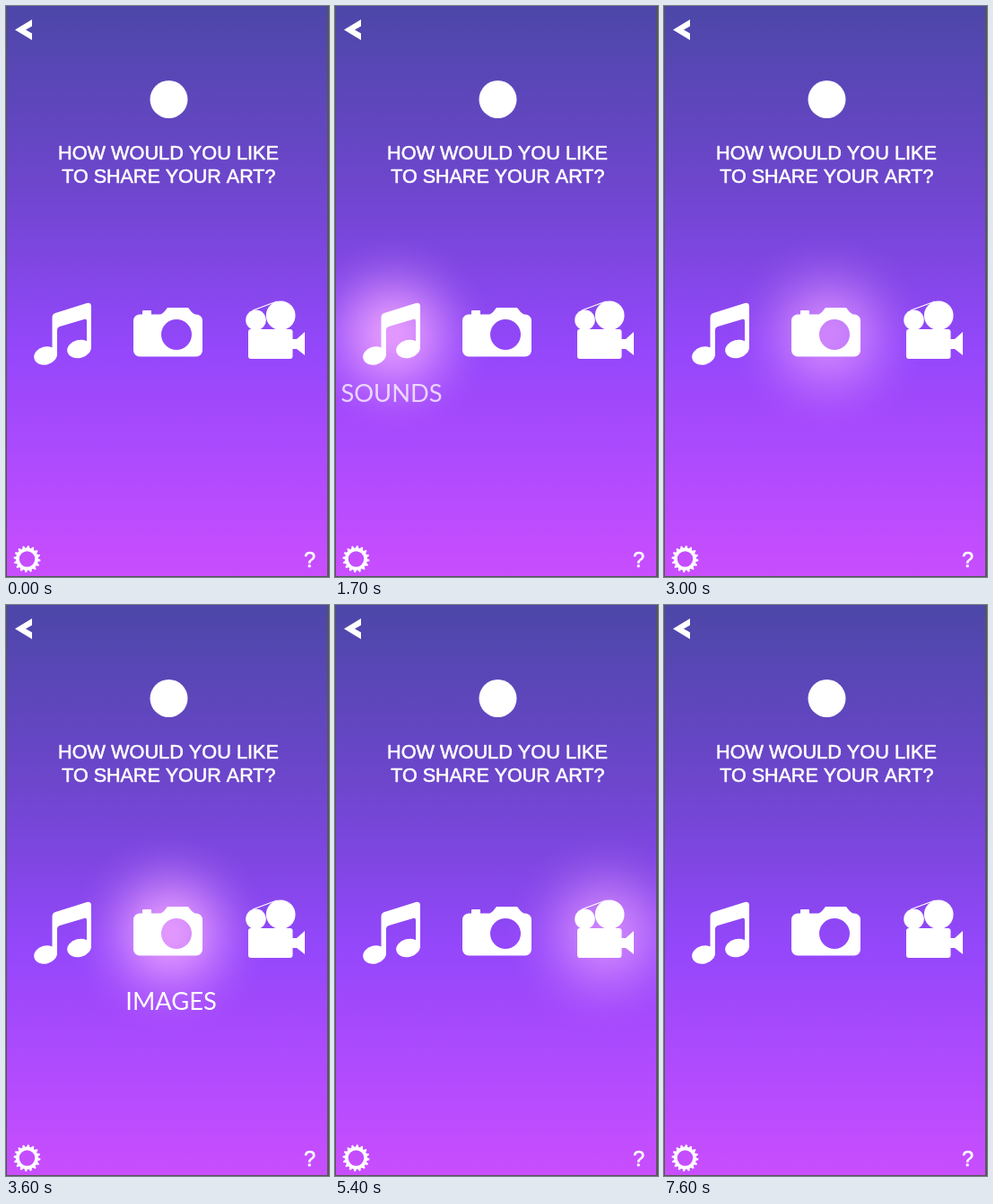
These frames come from a looping animation (360 px wide and 636 px high, 7700 ms). An HTML page with a canvas:

```html
<!DOCTYPE html>
<html lang="en">
<head>
<meta charset="utf-8">
<title>Share your art</title>
<style>
html, body { margin: 0; width: 100%; height: 100%; overflow: hidden; background: #4c47a8; }
canvas { display: block; }
</style>
</head>
<body>
<canvas id="stage"></canvas>
<script>
const W = 360, H = 636, STEP = 100, STEPS = 77;
const canvas = document.getElementById('stage');
const ctx = canvas.getContext('2d');
const ratio = window.devicePixelRatio || 1;
canvas.width = W * ratio;
canvas.height = H * ratio;
canvas.style.width = W + 'px';
canvas.style.height = H + 'px';
ctx.scale(ratio, ratio);

const items = [
  { label: 'SOUNDS', x: 63, base: 440.5, gx: 65, gy: 366 },
  { label: 'IMAGES', x: 184, base: 451, gx: 183, gy: 365 },
  { label: 'VIDEOS', x: 301, base: 458, gx: 302, gy: 365 }
];
const clamp = v => Math.max(0, Math.min(1, v));

const sky = ctx.createLinearGradient(0, 0, 0, H);
sky.addColorStop(0, '#4c47a8');
sky.addColorStop(0.3, '#6c46cb');
sky.addColorStop(0.6, '#9447fb');
sky.addColorStop(1, '#c94eff');

function poly(...pts) {
  ctx.beginPath();
  for (let i = 0; i < pts.length; i += 2) ctx.lineTo(pts[i], pts[i + 1]);
  ctx.closePath();
  ctx.fill();
}

function oval(x, y, rx, ry = rx, turn = 0) {
  ctx.beginPath();
  ctx.ellipse(x, y, rx, ry, turn, 0, Math.PI * 2);
  ctx.fill();
}

function text(str, x, y, font, weight = 0) {
  ctx.font = font;
  ctx.fillText(str, x, y);
  if (weight) {
    ctx.lineWidth = weight;
    ctx.strokeText(str, x, y);
  }
}

function glow(x, y, alpha) {
  if (!alpha) return;
  const R = 112;
  const g = ctx.createRadialGradient(x, y, 0, x, y, R);
  for (let i = 0; i <= 12; i++) {
    const d = i / 12;
    const a = 0.87 * Math.exp(-3 * d * d) * (1 - d ** 4);
    g.addColorStop(d, `rgba(238,164,255,${a.toFixed(3)})`);
  }
  ctx.globalAlpha = alpha;
  ctx.fillStyle = g;
  ctx.fillRect(x - R, y - R, R * 2, R * 2);
  ctx.globalAlpha = 1;
}

function note() {
  oval(44, 389.5, 13, 10, -0.25);
  oval(81.5, 382, 13.5, 10, -0.25);
  ctx.beginPath();
  ctx.moveTo(51.5, 388);
  ctx.lineTo(51.5, 347);
  ctx.quadraticCurveTo(51.5, 343, 55, 342);
  ctx.lineTo(90, 331);
  ctx.quadraticCurveTo(95, 330, 95, 335);
  ctx.lineTo(95, 382);
  ctx.lineTo(90, 382);
  ctx.lineTo(90, 351);
  ctx.quadraticCurveTo(90, 348, 87, 349);
  ctx.lineTo(60, 357);
  ctx.quadraticCurveTo(57, 358, 57, 361);
  ctx.lineTo(57, 390);
  ctx.fill();
}

function camera() {
  ctx.beginPath();
  ctx.roundRect(142, 343.5, 77, 47, 7);
  ctx.moveTo(207, 366);
  ctx.arc(190, 366, 17, 0, Math.PI * 2);
  ctx.fill('evenodd');
  poly(172, 344, 176, 341, 180, 336, 203, 336, 207, 341, 211, 344);
  ctx.beginPath();
  ctx.roundRect(152, 339, 10, 6, 1);
  ctx.fill();
}

function projector() {
  oval(306.2, 344.8, 16.3);
  oval(278.5, 349.7, 11.3);
  ctx.beginPath();
  ctx.moveTo(275, 339);
  ctx.lineTo(302, 329);
  ctx.lineWidth = 1.3;
  ctx.stroke();
  ctx.beginPath();
  ctx.roundRect(270, 360, 49.5, 33, 3);
  ctx.fill();
  poly(319, 371, 324, 371, 333, 363, 333, 389, 324, 382, 319, 382);
}

function gear(x, y) {
  const teeth = 16;
  ctx.beginPath();
  for (let i = 0; i < teeth * 4; i++) {
    const a = (i + 0.5) / (teeth * 4) * Math.PI * 2;
    const r = i % 4 < 2 ? 15 : 12.4;
    ctx.lineTo(x + r * Math.cos(a), y + r * Math.sin(a));
  }
  ctx.closePath();
  ctx.moveTo(x + 8.7, y);
  ctx.arc(x, y, 8.7, 0, Math.PI * 2);
  ctx.fill('evenodd');
}

function draw(n) {
  ctx.fillStyle = sky;
  ctx.fillRect(0, 0, W, H);

  // Each item: glow in, label in, hold, label out, glow out.
  const states = items.map((item, i) => {
    const k = n - (1 + 24 * i);
    return {
      ...item,
      light: clamp((k + 1) / 8) * (1 - clamp((k - 19) / 8)),
      show: clamp((k - 7) / 4) * (1 - clamp((k - 15) / 4))
    };
  });
  for (const s of states) glow(s.gx, s.gy, s.light);

  ctx.fillStyle = '#565656';
  ctx.fillRect(0, 0, 1, H);
  ctx.fillRect(358, 0, 2, H);
  ctx.fillRect(0, 635, W, 1);

  ctx.fillStyle = ctx.strokeStyle = '#fff';
  ctx.textAlign = 'center';
  ctx.lineJoin = 'round';
  poly(10, 26.5, 29, 15, 29, 22.5, 22, 26.5, 29, 30.5, 29, 38);
  oval(181.5, 104, 21);
  const sans = '"Liberation Sans", Arial, sans-serif';
  text('HOW WOULD YOU LIKE', 181, 171, '21.7px ' + sans, 0.6);
  text('TO SHARE YOUR ART?', 181.3, 196.8, '21.5px ' + sans, 0.6);
  text('?', 338.5, 625, '23.5px ' + sans, 0.6);
  note();
  camera();
  projector();
  gear(23.5, 616);

  for (const s of states) {
    if (!s.show) continue;
    ctx.globalAlpha = s.show;
    text(s.label, s.x, s.base, '27.3px Lato, sans-serif');
  }
  ctx.globalAlpha = 1;
}

const start = performance.now();
function tick() {
  draw(Math.floor((performance.now() - start) / STEP) % STEPS);
  requestAnimationFrame(tick);
}
tick();
</script>
</body>
</html>
```
